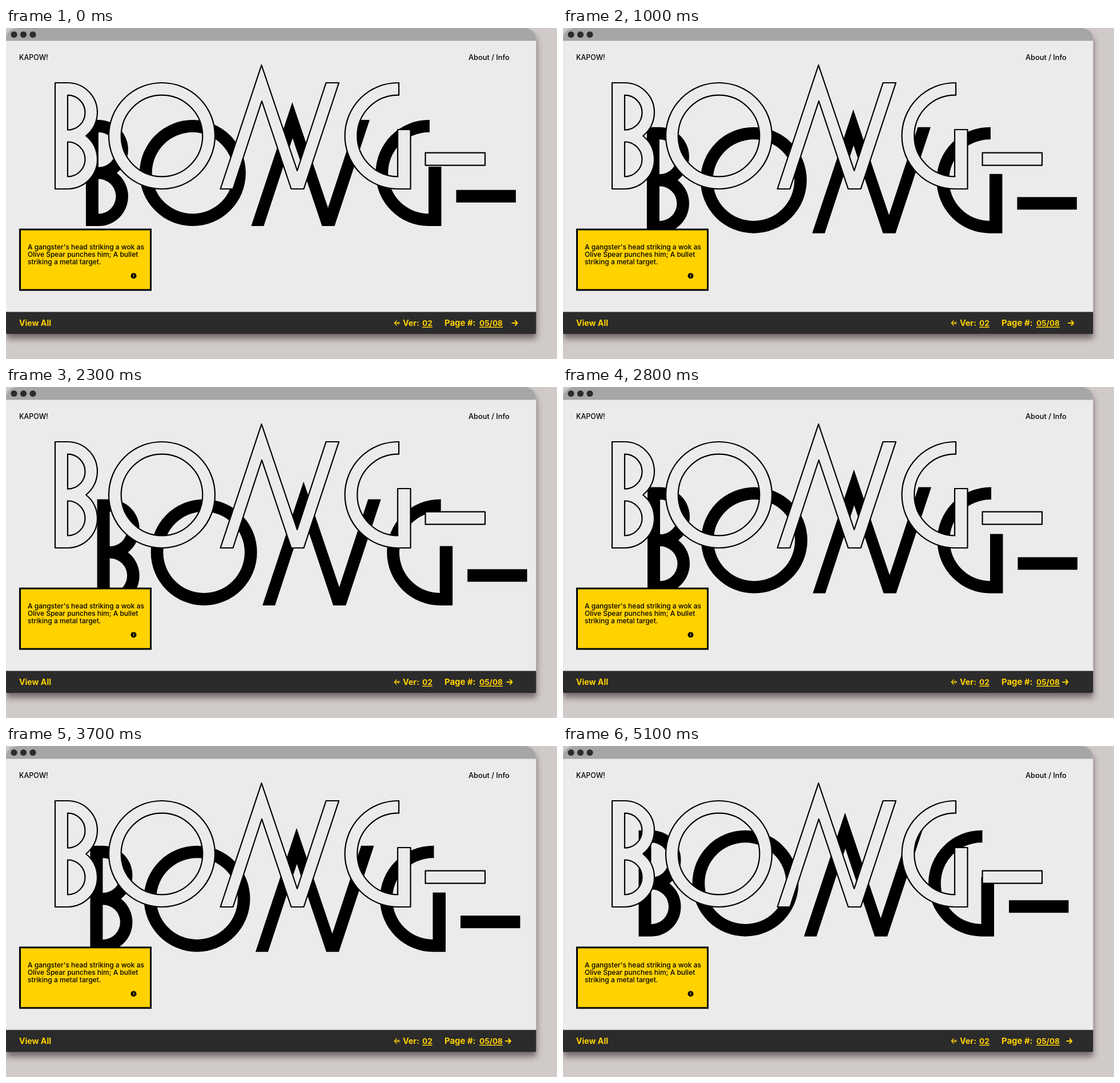
Animation, 965 px wide and 580 px high, one loop 5200 ms. Source, as an HTML page with a canvas:

```html
<!DOCTYPE html>
<html lang="en">
<head>
<meta charset="utf-8">
<title>KAPOW!</title>
<style>
  html, body { margin: 0; width: 100%; height: 100%; overflow: hidden; background: #d0cbc8; }
  canvas { display: block; }
</style>
</head>
<body>
<canvas id="stage" width="965" height="580"></canvas>
<script>
const ctx = document.getElementById('stage').getContext('2d');
const LOOP = 5200, STEP = 100, TAU = Math.PI * 2;
const YELLOW = '#ffd200', PAPER = '#ebebeb', DARK = '#2b2b2b', BLACK = '#000';

function polygon(path, points) {
  points.forEach(([x, y], i) => i ? path.lineTo(x, y) : path.moveTo(x, y));
  path.closePath();
}

function halfDisc(path, x, y, r) {
  path.moveTo(x, y - r);
  path.arc(x, y, r, -Math.PI / 2, Math.PI / 2);
  path.closePath();
}

function buildWord() {
  const word = new Path2D();

  // B: two bowls that meet in a notch
  const notch = Math.asin(40.75 / 52);
  word.moveTo(86, 96);
  word.lineTo(108, 96);
  word.arc(108, 148, 52, -Math.PI / 2, notch);
  word.arc(108, 230, 52, -notch, Math.PI / 2);
  word.lineTo(86, 282);
  word.closePath();
  halfDisc(word, 108, 148.2, 30.5);
  halfDisc(word, 108, 230, 30.5);

  // O
  for (const r of [93, 71.3]) {
    word.moveTo(273 + r, 189);
    word.arc(273, 189, r, 0, TAU);
    word.closePath();
  }

  // N
  polygon(word, [[375.5, 282], [447.5, 65], [510, 250], [560.5, 96], [583, 96],
    [521.5, 282], [499.5, 282], [448, 128], [397.5, 282]]);

  // G
  word.moveTo(688, 96);
  word.arc(686.5, 189, 93, -Math.PI / 2, Math.PI / 2, true);
  word.lineTo(708.5, 282);
  word.lineTo(708.5, 178);
  word.lineTo(686, 178);
  word.lineTo(686, 260.3);
  word.arc(686.5, 189, 71.3, Math.PI / 2, -Math.PI / 2);
  word.lineTo(688, 117.7);
  word.closePath();

  word.rect(734.5, 218.7, 104.5, 22);
  return word;
}
const word = buildWord();

function disc(x, y, r, color) {
  ctx.fillStyle = color;
  ctx.beginPath();
  ctx.arc(x, y, r, 0, TAU);
  ctx.fill();
}

function box(x, y, w, h, color) {
  ctx.fillStyle = color;
  ctx.fillRect(x, y, w, h);
}

function label(text, x, y, size, weight, color) {
  ctx.font = `${weight} ${size}px Inter, sans-serif`;
  ctx.fillStyle = color;
  ctx.fillText(text, x, y);
  return ctx.measureText(text).width;
}

function underlined(text, x, y, size) {
  const width = label(text, x, y, size, 700, YELLOW);
  box(x, y + 1.5, width, 1.5, YELLOW);
}

function strokeLine(points, width) {
  ctx.lineWidth = width;
  ctx.beginPath();
  points.forEach(([x, y]) => ctx.lineTo(x, y));
  ctx.stroke();
}

function arrow(x, y, dir, size, width) {
  ctx.strokeStyle = YELLOW;
  strokeLine([[x - dir * size, y], [x + dir * size, y]], width);
  strokeLine([[x + dir, y - 4], [x + dir * size, y], [x + dir, y + 4]], width);
}

function drawWindow() {
  box(0, 0, 965, 580, '#d0cbc8');
  ctx.save();
  ctx.beginPath();
  ctx.roundRect(0, 0, 928.5, 536.5, [20, 20, 3, 3]);
  ctx.save();
  ctx.shadowColor = 'rgba(60, 40, 48, 0.6)';
  ctx.shadowBlur = 11;
  ctx.shadowOffsetX = 0.5;
  ctx.shadowOffsetY = 8;
  ctx.fillStyle = PAPER;
  ctx.fill();
  ctx.restore();
  ctx.clip();
  box(0, 0, 929, 22.5, '#a6a6a6');
  box(0, 497.5, 929, 40, DARK);
  ctx.restore();
  for (const x of [14, 30.5, 47]) disc(x, 11.5, 5.6, DARK);
  label('KAPOW!', 23, 56, 12.4, 500, BLACK);
  label('About / Info', 810, 56, 12.8, 500, BLACK);
}

function drawWord(dx, dy) {
  ctx.save();
  ctx.translate(dx, dy);
  ctx.fillStyle = BLACK;
  ctx.fill(word, 'evenodd');
  ctx.restore();
  ctx.fillStyle = PAPER;
  ctx.fill(word, 'evenodd');
  ctx.strokeStyle = BLACK;
  ctx.lineWidth = 2.2;
  ctx.stroke(word);
}

function drawCaption() {
  box(23, 351.5, 232, 109, BLACK);
  box(26, 354.5, 226, 103, YELLOW);
  const lines = ["A gangster's head striking a wok as",
    'Olive Spear punches him; A bullet', 'striking a metal target.'];
  lines.forEach((line, i) => label(line, 38, 388 + i * 13, 12, 500, BLACK));
  disc(223.5, 434.3, 5, BLACK);
  label('i', 222.4, 437, 7.5, 'italic 700', YELLOW);
}

function drawFooter(arrowX) {
  label('View All', 23, 522, 14.1, 700, YELLOW);
  arrow(685, 517, -1, 4.5, 1.5);
  strokeLine([[688, 514.5], [685, 517], [688, 519.5]], 1);
  label('Ver:', 695, 522, 14.3, 700, YELLOW);
  underlined('02', 729, 522, 13.6);
  label('Page #:', 768, 522, 14.9, 700, YELLOW);
  underlined('05/08', 829, 522, 13.6);
  arrow(arrowX, 517, 1, 4.5, 2);
}

// Swings between 0 and 1, leaving each end faster than it arrives
function swingAt(t) {
  const lag = 0.14 * Math.exp(-(((t - 3.08) / 0.25) ** 2));
  const angle = Math.PI * (t - lag - 0.619) / 0.89;
  return (1 + Math.cos(angle + 0.2 * Math.sin(angle) ** 2)) / 2;
}

function draw(ms) {
  const t = ms / 1000;
  const swing = swingAt(t);
  drawWindow();
  drawWord(46.4 + 28 * swing, 51.5 + 50.5 * swing);
  drawCaption();
  drawFooter(885 + 6.2 * Math.cos(1.03 * t - 0.28));
}

ctx.lineJoin = ctx.lineCap = 'round';
const start = performance.now();
function tick() {
  const elapsed = (performance.now() - start) % LOOP;
  draw(Math.floor(elapsed / STEP) * STEP);
  requestAnimationFrame(tick);
}
tick();
</script>
</body>
</html>
```
